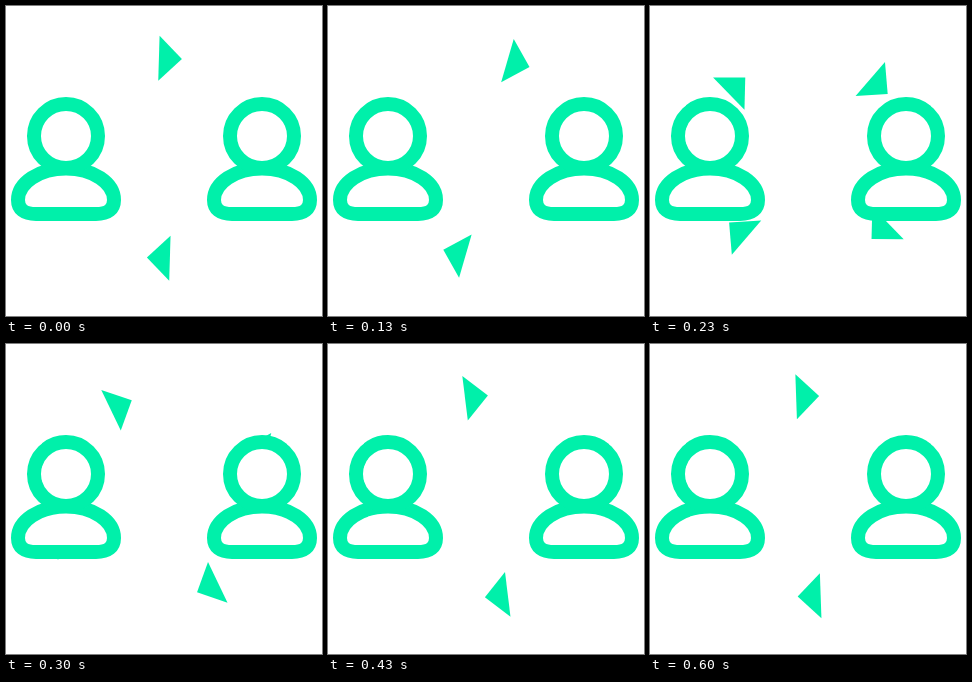
An HTML page that plays this animation: 316 by 310 pixels, repeating every 630 ms.

```html
<!DOCTYPE html>
<html lang="en">
<head>
<meta charset="utf-8">
<title>Exchange between two people</title>
<style>
  html, body { margin: 0; width: 100%; height: 100%; overflow: hidden; background: #fff; }
  svg { display: block; width: 316px; height: 310px; }
  .arrow { fill: #00f0aa; }
  .person { fill: #fff; stroke: #00f0aa; stroke-width: 14; }
</style>
</head>
<body>
<svg viewBox="0 0 316 310">
  <defs>
    <polygon id="arrow" points="149.8,30 172.8,52.5 149.8,75"/>
    <g id="person">
      <path d="M30 208C18 208 12 203 12 194C12 177 33 162.5 60 162.5C87 162.5 108 177 108 194C108 203 102 208 90 208Z"/>
      <circle cx="60" cy="130" r="32"/>
    </g>
    <g id="pair">
      <use id="leaving" href="#arrow"/>
      <use id="arriving" href="#arrow"/>
    </g>
  </defs>
  <g class="arrow">
    <use href="#pair"/>
    <use href="#pair" transform="rotate(180 158.4 152.3)"/>
  </g>
  <g class="person">
    <use href="#person"/>
    <use href="#person" x="196"/>
  </g>
</svg>
<script>
  const LOOP = 630, STEP = 100 / 3, STEPS = 19, BIRTH = 5;

  // [age in steps, angle along the arc]: quick at both ends, slow at the crest
  const stops = [
    [0, -68], [2, -44.2], [4, -25.7], [8, -7], [11, -3], [13, -2],
    [14, 1.7], [16, 6.7], [19, 22.4], [21, 40.8], [23, 61], [24, 72]
  ];
  const last = stops.length - 1;

  function slope(i) {
    const a = stops[Math.max(i - 1, 0)], b = stops[Math.min(i + 1, last)];
    return (b[1] - a[1]) / (b[0] - a[0]);
  }

  // Smooth curve through the stops
  function angleAt(age) {
    let i = 0;
    while (i < last - 1 && age > stops[i + 1][0]) i++;
    const [x0, y0] = stops[i], [x1, y1] = stops[i + 1];
    const h = x1 - x0, u = (age - x0) / h, v = 1 - u;
    return v * v * (1 + 2 * u) * y0 + u * u * (3 - 2 * u) * y1
      + h * u * v * (v * slope(i) - u * slope(i + 1));
  }

  function place(id, age) {
    const el = document.getElementById(id);
    const alive = age >= 0 && age <= stops[last][0];
    el.setAttribute('visibility', alive ? 'visible' : 'hidden');
    if (alive) el.setAttribute('transform', `rotate(${angleAt(age).toFixed(2)} 157.5 157.5)`);
  }

  const start = performance.now();

  function draw() {
    const t = (performance.now() - start) % LOOP;
    const step = Math.min(Math.floor((t + 3.4) / STEP), STEPS - 1);
    place('leaving', step + STEPS - BIRTH);
    place('arriving', step - BIRTH);
    requestAnimationFrame(draw);
  }
  draw();
</script>
</body>
</html>
```
